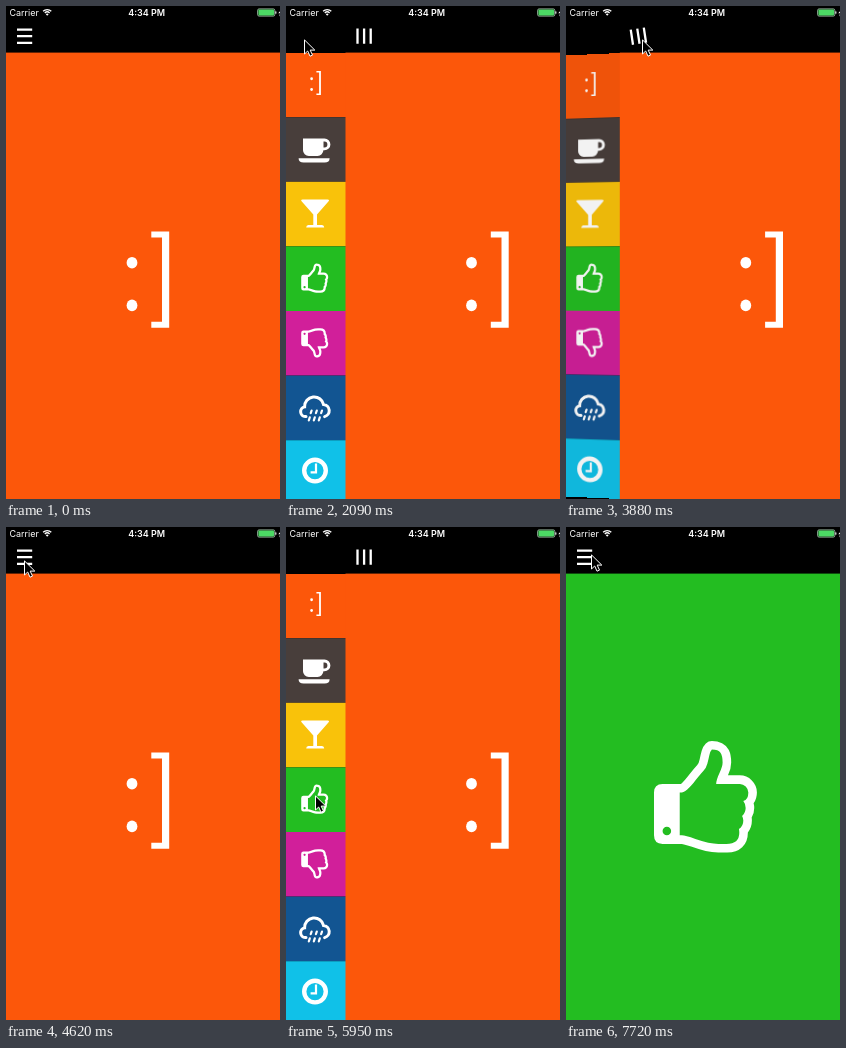
An HTML page for the animation above (8 s loop, 274 by 493 pixels).

```html
<!DOCTYPE html>
<html lang="en">
<head>
<meta charset="utf-8">
<title>Hinged side menu</title>
<style>
  html, body { margin: 0; width: 100%; height: 100%; overflow: hidden; background: #000; }
  #stage { position: relative; width: 274px; height: 493px; overflow: hidden; background: #000; }
  svg { position: absolute; left: 0; top: 0; display: block; }
  #menu { position: absolute; left: 0; top: 46.6px; width: 59.5px; height: 446.4px; overflow: hidden; transform-origin: 100% 50%; }
  #menu svg { top: -46.6px; }
  text { font: 9px Inter, "Liberation Sans", sans-serif; fill: #fff; }
</style>
</head>
<body>
<div id="stage">
  <div id="menu">
    <svg width="60" height="493" viewBox="0 0 60 493" fill="#fff">
      <g id="cells"></g>
      <use href="#smile" transform="translate(29.6 77) scale(.25) translate(-142 -273.7)"/>
      <g id="cup">
        <path fill-rule="evenodd" d="M17 132.5H38.5a5.8 5.8 0 0 1 0 11.8H37.4a6 6 0 0 1-5.8 5.7H22.8a5.8 5.8 0 0 1-5.8-5.8ZM37.5 135.4V141.4H38.4a3 3 0 0 0 0-6Z"/>
        <path d="M12.6 152.2H43.6q0 4.3-5 4.3H17.6q-5 0-5-4.3Z"/>
      </g>
      <path d="M16.6 193.5H41.6q2.4 0 .8 2L31 208.6V219H36q2.2 0 2.2 2.6H20.2q0-2.6 2.2-2.6H27.3V208.6L15.8 195.5q-1.6-2 .8-2Z"/>
      <use href="#hand" transform="translate(15.2 257.5) scale(.0176)"/>
      <use href="#hand" transform="translate(15.2 351.5) scale(.0176 -.0176)"/>
      <g fill="none" stroke="#fff" stroke-linecap="round">
        <path stroke-width="3" d="M20 410.6H19.2a4.9 4.9 0 0 1-.6-9.7A9.6 9.6 0 0 1 37.6 398.6a6.1 6.1 0 0 1 1 12"/>
        <path stroke-width="2.2" d="M25.6 404.6l-.9 2.6m6.1-2.6l-.9 2.6m6.1-2.6l-.9 2.6M23.8 411.4l-1 3m6-3l-1 3m6-3l-1 3"/>
      </g>
      <g fill="none" stroke="#fff">
        <circle cx="29" cy="464.6" r="10.8" stroke-width="4.4"/>
        <path stroke-width="2.2" d="M30 457.6V466.4H24.6"/>
      </g>
    </svg>
  </div>

  <svg width="274" height="493" viewBox="0 0 274 493" fill="#fff">
    <defs>
      <g id="smile">
        <ellipse cx="126" cy="256.7" rx="5.4" ry="5.8"/>
        <ellipse cx="126" cy="299.4" rx="5.4" ry="5.8"/>
        <path d="M145.3 225.5H163.2V321.8H145.3V315.8H156V231.5H145.3Z"/>
      </g>
      <path id="hand" fill-rule="evenodd"/>
    </defs>

    <g id="detail">
      <rect id="sheet" y="46.6" width="274" height="447"/>
      <use id="bigSmile" href="#smile"/>
      <use id="bigHand" href="#hand" transform="translate(88 214) scale(.067)"/>
    </g>

    <text x="3.4" y="9.6">Carrier</text>
    <text x="140.7" y="9.6" text-anchor="middle" font-weight="600" style="font-weight:600">4:34 PM</text>
    <g fill="none" stroke="#fff" stroke-width="1.3">
      <path d="M37.1 5.3a5.8 5.8 0 0 1 8.2 0M38.8 7a3.4 3.4 0 0 1 4.8 0"/>
    </g>
    <path d="M39.8 8.2a2 2 0 0 1 2.8 0L41.2 9.7Z"/>
    <rect x="251.6" y="2.9" width="17.2" height="7.2" rx="1.5" fill="none" stroke="#c8efd0" stroke-width=".7"/>
    <rect x="252.4" y="3.6" width="15.6" height="5.8" rx=".8" fill="#4cd964"/>
    <rect x="269.3" y="5.2" width="1.1" height="2.6" rx=".5"/>
    <path d="M276 3.2L272.3 7.2H274.2L273 10.4 277 6.2H275Z"/>

    <path id="burger" stroke="#fff" stroke-width="2.3" d="M-7.6-6.6H7.6M-7.6 0H7.6M-7.6 6.6H7.6"/>
    <path id="cursor" fill="#000" stroke="#fff" stroke-width="1" stroke-linejoin="round" d="M.5.9V15L3.7 12 6 17.2 8.5 16.1 6.2 11.1H10.8Z"/>
  </svg>
</div>

<script>
const LOOP = 8000, TICK = 148.4, LEAD = 3;
const MENU_W = 59.5, CELL_H = 64.6, TOP = 46.6;
const ORANGE = '#fc570a', GREEN = '#23bd21';
const COLORS = [ORANGE, '#483e3b', '#f9c20a', GREEN, '#d11f9a', '#125592', '#10c1e8'];
const PICK = 3, PICK_TICK = 42, CURSOR_IN = 5;

const $ = id => document.getElementById(id);

// Thumb: outer edge, inner edge, cuff button
const outerEdge = 'M1536 767q0 89-49 163q9 33 9 69q0 77-38 144q3 21 3 43q0 101-60 178q1 139-85 220t-227 80h-129' +
  'q-96 0-189-22t-217-66q-116-40-138-40h-288q-128 0-128-128v-640q0-128 128-128h274q36-24 137-155q58-75 107-128' +
  'q24-25 36-86t30-126t62-108q39-37 90-37q84 0 151 32t102 102t35 186q0 93-48 192h176q104 0 180 76t76 179z';
const innerEdge = 'M1408 768q0-51-39-90t-89-38h-352q0-58 48-160t48-160q0-98-32-145t-128-47q-26 26-38 85t-30 125t-60 110' +
  'q-22 23-77 91C569 654 479 768 416 768h-32v640h32q50 0 202 55q211 73 342 73h121q192 0 192-167q0-26-5-56' +
  'q65-40 65-126q0-37-18-69q53-50 53-119q0-60-35-103q75-20 75-128z';
const button = 'M256 1344a64 64 0 1 0-128 0a64 64 0 1 0 128 0z';
$('hand').setAttribute('d', outerEdge + innerEdge + button);

const cells = COLORS.map((color, i) => {
  const cell = document.createElementNS('http://www.w3.org/2000/svg', 'rect');
  const attrs = { y: TOP + i * CELL_H, width: 60, height: CELL_H, fill: color };
  for (const key in attrs) cell.setAttribute(key, attrs[key]);
  $('cells').append(cell);
  return cell;
});

// Times are in ticks
const SLIDES = [
  { at: 12.05, for: 1.95, to: 1 },
  { at: 25.56, for: 2.3, to: 0 },
  { at: 32.5, for: 2.3, to: 1 },
  { at: 41.56, for: 2.3, to: 0 }
];
const MOVES = [
  { at: 4.4, for: 4.6, x: 18, y: 33 },
  { at: 16.3, for: 2.7, x: 91, y: 55 },
  { at: 20.3, for: 2.7, x: 76, y: 33 },
  { at: 27, for: 4, x: 18, y: 33 },
  { at: 34, for: 6, x: 29, y: 268 },
  { at: 47.3, for: 4.7, x: 25, y: 27, bulge: 10 }
];

const ease = k => k * k * (3 - 2 * k);
const progress = (n, m) => Math.min(1, Math.max(0, (n - m.at) / m.for));

function openness(n) {
  return SLIDES.reduce((f, s) => f + (s.to - f) * ease(progress(n, s)), 0);
}

function pointer(n) {
  let x = -6, y = 80;
  for (const m of MOVES) {
    const k = ease(progress(n, m));
    x += (m.x - x) * k + (m.bulge || 0) * Math.sin(Math.PI * k);
    y += (m.y - y) * k;
  }
  return [x, y];
}

function draw(time) {
  const n = Math.max(0, Math.floor((time % LOOP - LEAD) / TICK));
  const f = openness(n), shift = f * MENU_W, picked = n >= PICK_TICK;

  const menu = $('menu').style;
  menu.visibility = f > 0 ? 'visible' : 'hidden';
  menu.opacity = Math.sqrt(f);
  menu.transform = f === 1 ? 'none'
    : `translateX(${shift - MENU_W}px) perspective(739px) rotateY(${(f - 1) * 90}deg)`;
  cells[PICK].setAttribute('fill', picked ? '#9cc096' : GREEN);

  $('detail').setAttribute('transform', `translate(${shift} 0)`);
  $('sheet').setAttribute('fill', picked ? GREEN : ORANGE);
  $('bigSmile').style.display = picked ? 'none' : '';
  $('bigHand').style.display = picked ? '' : 'none';

  $('burger').setAttribute('transform', `translate(${18.6 + shift} 30.2) rotate(${f * 90})`);
  $('cursor').setAttribute('transform', `translate(${pointer(n)})`);
  $('cursor').style.display = n < CURSOR_IN ? 'none' : '';
}

function loop(now) {
  draw(now);
  requestAnimationFrame(loop);
}
draw(0);
requestAnimationFrame(loop);
</script>
</body>
</html>
```
